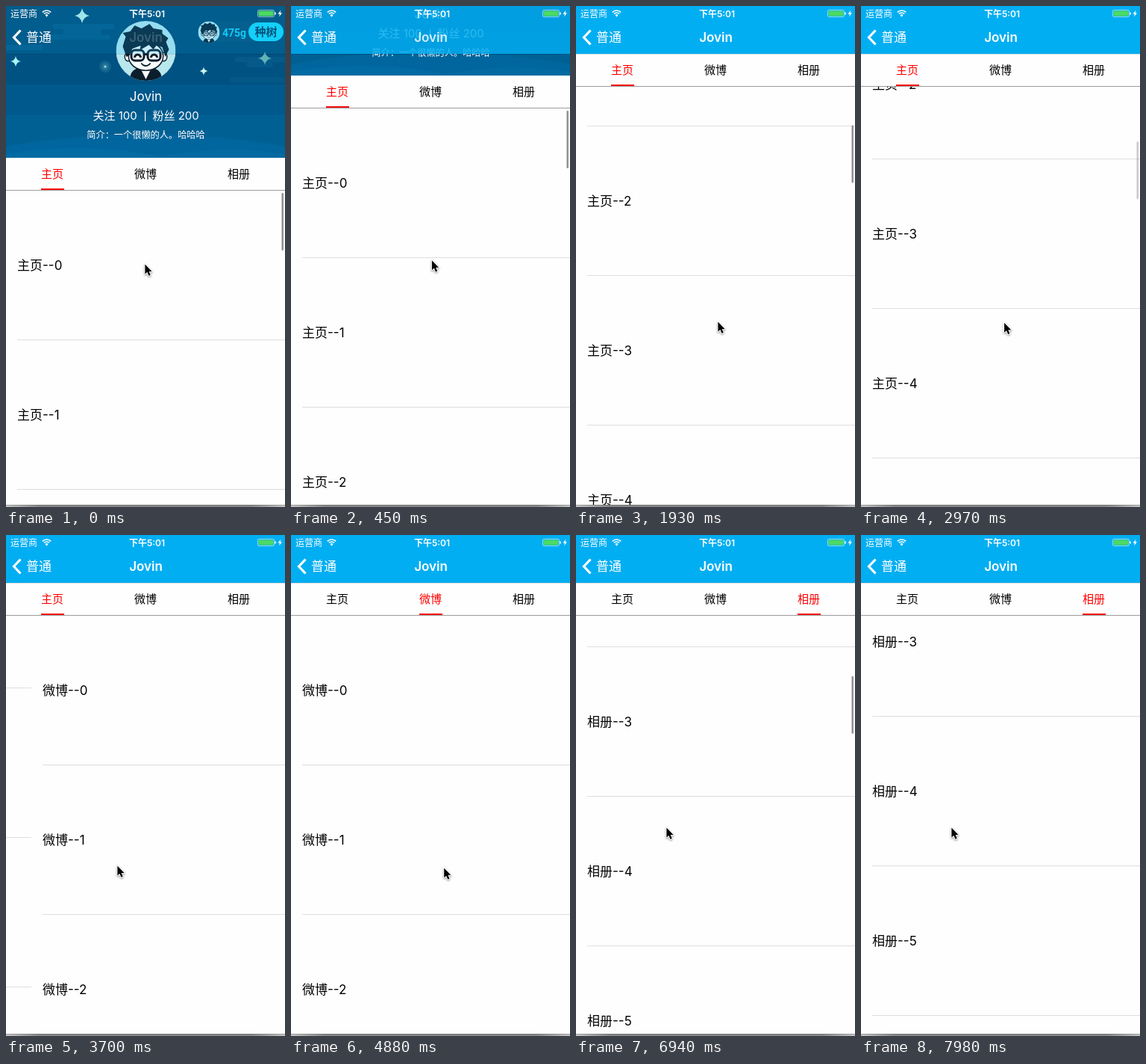
Recreate the animation shown at these times as an HTML page with a canvas. Size 374 by 670 pixels, loop 8000 ms.

```html
<!DOCTYPE html>
<html lang="zh">
<head>
<meta charset="utf-8">
<style>
html, body { margin: 0; width: 374px; height: 670px; overflow: hidden; background: #fefefe; }
canvas { display: block; width: 374px; height: 670px; }
</style>
</head>
<body>
<canvas id="stage"></canvas>
<script>
const W = 374, H = 670, LOOP = 8000, TICK = 147.8;
const NAV = 64, TAB_H = 44, HEAD = 203, COLLAPSE = HEAD - NAV, ROW = 200;
const NAME = 'Jovin', TABS = ['主页', '微博', '相册'];
const FONT = 'Inter, "Noto Sans CJK SC", "Noto Sans CJK", sans-serif';
const canvas = document.getElementById('stage');
const ctx = canvas.getContext('2d');
const dpr = window.devicePixelRatio || 1;
canvas.width = W * dpr;
canvas.height = H * dpr;

const clamp = (v, a = 0, b = 1) => Math.min(b, Math.max(a, v));
const part = (t, a, b) => clamp((t - a) / (b - a));
const smooth = p => p * p * (3 - 2 * p);

// time, x, y of the pointer tip
const pointerKeys = [
  [0, 186, 345], [150, 186, 345], [880, 193, 330], [900, 193, 330], [1310, 192, 510],
  [1550, 190, 422], [2900, 190, 422], [3230, 212, 438], [3450, 149, 442], [3850, 149, 442],
  [4000, 153, 441], [4150, 153, 441], [4590, 204, 444], [4800, 204, 444], [4980, 206, 446],
  [5180, 143, 459], [5850, 143, 459], [6143, 121, 391], [8000, 121, 391]
];

function pointerAt(t) {
  const i = Math.max(1, pointerKeys.findIndex(k => k[0] > t));
  const a = pointerKeys[i - 1], b = pointerKeys[i];
  const p = smooth(part(t, a[0], b[0]));
  return [a[1] + (b[1] - a[1]) * p, a[2] + (b[2] - a[2]) * p];
}

// a finger drag followed by a decaying glide
function flick(t, start, release, from, end, left, ref) {
  const glide = u => end - left * Math.exp((ref - u) / 500);
  if (t >= release) return glide(t);
  const p = part(t, start, release);
  return from + (glide(release) - from) * p * p;
}

function firstScroll(t) {
  if (t < 1340) {
    const p = part(t, 150, 880);
    return 149 * (1 - Math.exp(-3 * p)) / (1 - Math.exp(-3));
  }
  return COLLAPSE + flick(Math.min(t, 2513), 1340, 1550, 10, 571.8, 224.8, 1921);
}

const lastScroll = t => t < 5900 ? 0 : flick(t, 5900, 6143, 0, 680.5, 122.5, 6947);

function swipe(t, start, release) {
  if (t < release) return 62 * part(t, start, release) ** 2;
  if (t > release + 535) return W;
  return W - 312 * Math.exp((release - t) / 110.5);
}

function rect(x, y, w, h, color) {
  ctx.fillStyle = color;
  ctx.fillRect(x, y, w, h);
}

function pill(x, y, w, h, color, r = h / 2) {
  ctx.fillStyle = color;
  ctx.beginPath();
  ctx.roundRect(x, y, w, h, r);
  ctx.fill();
}

function oval(x, y, rx, ry, color) {
  ctx.fillStyle = color;
  ctx.beginPath();
  ctx.ellipse(x, y, rx, ry, 0, 0, 7);
  ctx.fill();
}

function poly(points, color) {
  ctx.fillStyle = color;
  ctx.beginPath();
  points.forEach(p => ctx.lineTo(p[0], p[1]));
  ctx.closePath();
  ctx.fill();
}

// y is the middle of the capitals
function text(s, x, y, size, color, align = 'left', weight = 400) {
  ctx.font = `${weight} ${size}px ${FONT}`;
  ctx.textAlign = align;
  ctx.fillStyle = color;
  ctx.fillText(s, x, y + size * 0.36);
}

function star(x, y, r, color) {
  ctx.fillStyle = color;
  ctx.beginPath();
  ctx.moveTo(x, y - r);
  for (let i = 1; i <= 4; i++) {
    const a = i * Math.PI / 2;
    const m = a - Math.PI / 4;
    ctx.quadraticCurveTo(x + Math.sin(m) * r * 0.22, y - Math.cos(m) * r * 0.22,
      x + Math.sin(a) * r, y - Math.cos(a) * r);
  }
  ctx.fill();
}

function avatar(x, y, r) {
  const ink = '#0c1d2c', skin = '#f8fbfb';
  ctx.save();
  ctx.translate(x, y);
  ctx.scale(r / 40, r / 40);
  ctx.beginPath();
  ctx.arc(0, 0, 40, 0, 7);
  ctx.clip();
  rect(-40, -40, 80, 80, '#b9e7ee');
  pill(-21, 23, 42, 34, ink, 13);
  poly([[-8, 22], [8, 22], [0, 38]], skin);
  for (const side of [-1, 1]) {
    oval(side * 24, 8, 5, 6.5, ink);
    oval(side * 24, 8, 3.6, 5, skin);
  }
  oval(0, 7, 24, 20, ink);
  oval(0, 7, 22.5, 18.5, skin);
  poly([[-26, 8], [-31, -6], [-27, -19], [-31, -24], [-21, -26], [-15, -34], [-6, -30],
    [5, -36], [10, -30], [22, -28], [22, -23], [30, -17], [27, -12], [31, -2], [26, 8],
    [22, -5], [14, -7], [10, -2], [4, -8], [-8, -1], [-7, -7], [-18, -3], [-22, 6]], ink);
  ctx.strokeStyle = ink;
  ctx.lineWidth = 3;
  for (const side of [-1, 1]) {
    ctx.beginPath();
    ctx.roundRect(side * 11 - 8.5, -1, 17, 14, 5);
    ctx.stroke();
    ctx.beginPath();
    ctx.arc(side * 11, 9, 4, Math.PI, 0);
    ctx.stroke();
  }
  rect(-3, 3, 6, 3, ink);
  ctx.lineWidth = 1.8;
  ctx.beginPath();
  ctx.arc(0, 13, 7, 0.5, 2.64);
  ctx.stroke();
  ctx.restore();
}

function header(y) {
  ctx.save();
  ctx.translate(0, y);
  ctx.beginPath();
  ctx.rect(0, 0, W, HEAD);
  ctx.clip();
  rect(0, 0, W, HEAD, '#004873');
  rect(0, 64, W, 42, '#005282');
  rect(0, 105, W, 98, '#00598c');
  rect(0, 146, W, 57, '#006094');
  oval(187, 245, 300, 73, '#00669d');
  oval(95, 224, 150, 34, '#026ba3');
  oval(300, 230, 140, 38, '#026aa1');
  const cloud = '#045280';
  pill(62, 24, 84, 7, cloud);
  pill(76, 31, 52, 7, cloud);
  pill(48, 38, 92, 7, cloud);
  pill(-10, 52, 60, 7, cloud);
  pill(306, 68, 80, 7, '#055a8a');
  pill(322, 75, 36, 7, '#055a8a');
  pill(300, 95, 78, 7, '#045886');
  star(102, 13, 10, '#c3f3e6');
  star(13, 74, 7, '#a6f4f5');
  star(347, 70, 9, '#5fb5b5');
  star(265, 87, 5.5, '#c9f7ef');
  oval(133, 81, 8, 8, 'rgba(70,150,175,.25)');
  oval(133, 81, 4.5, 4.5, 'rgba(90,170,185,.3)');
  oval(133, 81, 1.5, 1.5, '#a8e0d8');

  pill(257, 21, 116, 27, '#064b75');
  avatar(272, 35, 14.5);
  ctx.font = '700 14px Roboto, sans-serif';
  ctx.textAlign = 'left';
  ctx.fillStyle = '#16d0f5';
  ctx.fillText('475g', 290, 40.5);
  pill(325, 22, 47, 25, '#16d8fb');
  text('种树', 348.5, 34.5, 15, '#003a5c', 'center', 700);

  avatar(187.5, 60, 40);
  text(NAME, 187.5, 121, 17, '#fff', 'center');
  text('关注 100', 116.5, 147, 15, '#fff');
  rect(186, 141, 1.2, 13, '#fff');
  text('粉丝 200', 196.5, 147, 15, '#fff');
  text('简介：一个很懒的人。哈哈哈', 187.5, 173, 12.2, '#fff', 'center');
  ctx.restore();
}

function statusBar() {
  text('运营商', 6, 10.5, 12, '#fff');
  text('下午5:01', 189, 10.5, 12, '#fff', 'center', 600);
  ctx.strokeStyle = '#fff';
  ctx.lineWidth = 1.7;
  for (const r of [5, 8]) {
    ctx.beginPath();
    ctx.arc(54.5, 14, r, -Math.PI * 0.75, -Math.PI * 0.25);
    ctx.stroke();
  }
  ctx.fillStyle = '#fff';
  ctx.beginPath();
  ctx.moveTo(54.5, 14.8);
  ctx.arc(54.5, 14, 2.8, -Math.PI * 0.75, -Math.PI * 0.25);
  ctx.fill();
  ctx.lineWidth = 0.8;
  ctx.strokeStyle = 'rgba(255,255,255,.7)';
  ctx.beginPath();
  ctx.roundRect(337.4, 5.4, 22.2, 9.2, 2);
  ctx.stroke();
  pill(338.5, 6.5, 20, 7, '#4cd964', 1);
  pill(360.3, 8.3, 1.5, 3.4, '#fff', 0.7);
  poly([[368.5, 5.5], [364.5, 10.8], [367, 10.8], [366, 14.5], [370, 9.3], [367.5, 9.3]], '#fff');
}

function navBar(alpha) {
  ctx.globalAlpha = alpha;
  rect(0, 0, W, NAV, '#02aef2');
  text(NAME, 187.5, 42, 17, '#fff', 'center', 600);
  ctx.globalAlpha = 1;
  rect(0, NAV, W, 1, 'rgba(0,0,0,.12)');
  ctx.strokeStyle = '#fff';
  ctx.lineWidth = 3.2;
  ctx.beginPath();
  ctx.moveTo(19.5, 32.5);
  ctx.lineTo(10.5, 42);
  ctx.lineTo(19.5, 51.5);
  ctx.stroke();
  text('普通', 27, 42, 17, '#fff');
  statusBar();
}

function tabBar(y, active) {
  rect(0, y, W, TAB_H, '#fefefe');
  rect(0, y + 43, W, 1, '#9c9c9c');
  TABS.forEach((s, i) => text(s, 62 + 125 * i, y + 21.5, 15, i === active ? '#f00' : '#000', 'center'));
  rect(47 + 125 * active, y + 41, 31, 2, '#f80f0f');
}

function list(page, x, tabY, off) {
  if (x <= -W || x >= W) return;
  ctx.save();
  ctx.beginPath();
  ctx.rect(0, tabY + TAB_H, W, H);
  ctx.clip();
  const first = Math.floor(off / ROW);
  for (let r = first; r < first + 4; r++) {
    const y = tabY + r * ROW - off;
    text(`${TABS[page]}--${r}`, x + 15, y + 144, 17, '#000');
    rect(x + 15, y + 243, W - 15, 1, '#dedede');
  }
  ctx.restore();
}

function scrollBar(tabY, off, alpha) {
  ctx.globalAlpha = alpha;
  pill(369.5, tabY + 47 + off * 0.1395, 2.5, 77, '#909090');
  ctx.globalAlpha = 1;
}

function bottomEdge() {
  const g = ctx.createLinearGradient(0, 0, W, 0);
  g.addColorStop(0, '#c4c4c4');
  g.addColorStop(0.12, '#868686');
  g.addColorStop(0.88, '#868686');
  g.addColorStop(1, '#c4c4c4');
  rect(0, 667, W, 3, g);
  rect(0, 667, W, 1, 'rgba(60,60,60,.25)');
}

function pointer(x, y) {
  const shape = new Path2D('M0 0V13.6L3.1 10.8L5.3 16L7.7 15L5.5 9.9H9.7Z');
  ctx.save();
  ctx.translate(x + 0.4, y + 0.6);
  ctx.scale(0.95, 0.95);
  ctx.lineJoin = 'round';
  ctx.strokeStyle = '#fff';
  ctx.lineWidth = 2;
  ctx.shadowColor = 'rgba(0,0,0,.45)';
  ctx.shadowBlur = 2.5 * dpr;
  ctx.shadowOffsetY = dpr;
  ctx.stroke(shape);
  ctx.shadowColor = 'transparent';
  ctx.fillStyle = '#000';
  ctx.fill(shape);
  ctx.restore();
}

function draw(t) {
  const scroll = Math.round(firstScroll(t));
  const fold = Math.min(scroll, COLLAPSE);
  const tabY = HEAD - fold;
  const shift = Math.round(swipe(t, 3200, 3450) + swipe(t, 4920, 5180));
  const offs = [scroll - fold, 0, Math.round(lastScroll(t))];

  ctx.setTransform(dpr, 0, 0, dpr, 0, 0);
  rect(0, 0, W, H, '#fefefe');
  offs.forEach((off, i) => list(i, i * W - shift, tabY, off));
  if (t < 3050) scrollBar(tabY, offs[0], 1 - part(t, 2850, 3050));
  else scrollBar(tabY, offs[2], part(t, 5900, 6000) * (1 - part(t, 7750, 7960)));
  if (fold < COLLAPSE) header(-fold);
  tabBar(tabY, Math.floor(shift / W));
  navBar(0.2 + 0.8 * fold / COLLAPSE);
  bottomEdge();
  pointer(...pointerAt(t));
}

const began = performance.now();
function frame() {
  const t = (performance.now() - began) % LOOP;
  draw(Math.floor((t + 10) / TICK) * TICK);
  requestAnimationFrame(frame);
}
frame();
</script>
</body>
</html>
```
